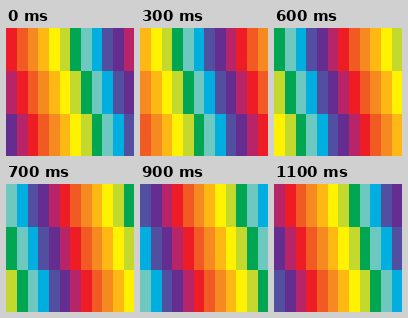
An HTML page with a canvas for the animation above (1200 ms loop, 128 by 128 pixels).

```html
<!DOCTYPE html>
<html lang="en">
<head>
<meta charset="utf-8">
<title>Rainbow bars</title>
<style>
  html, body { margin: 0; width: 100%; height: 100%; overflow: hidden; }
  canvas { display: block; width: 128px; height: 128px; }
</style>
</head>
<body>
<canvas width="128" height="128"></canvas>
<script>
const SIZE = 128, ROWS = 3, STEP = 100;
const colors = [
  '#ee1c25', '#f15a22', '#f6891f', '#fdb813', '#fff200', '#c4d92d',
  '#00a651', '#6dc8bf', '#00aee0', '#524fa1', '#662d91', '#b72467'
];
const count = colors.length;
const ctx = document.querySelector('canvas').getContext('2d');
const edge = (i, n) => Math.ceil(i * SIZE / n);

function draw(now) {
  const step = Math.floor(now / STEP) % count;
  for (let row = 0; row < ROWS; row++) {
    const y = edge(row, ROWS);
    for (let col = 0; col < count; col++) {
      const x = edge(col, count);
      // Each row trails the one above by one bar.
      ctx.fillStyle = colors[(col + step - row + count) % count];
      ctx.fillRect(x, y, edge(col + 1, count) - x, edge(row + 1, ROWS) - y);
    }
  }
}

const start = performance.now();
function tick() {
  draw(performance.now() - start);
  requestAnimationFrame(tick);
}
tick();
</script>
</body>
</html>
```
